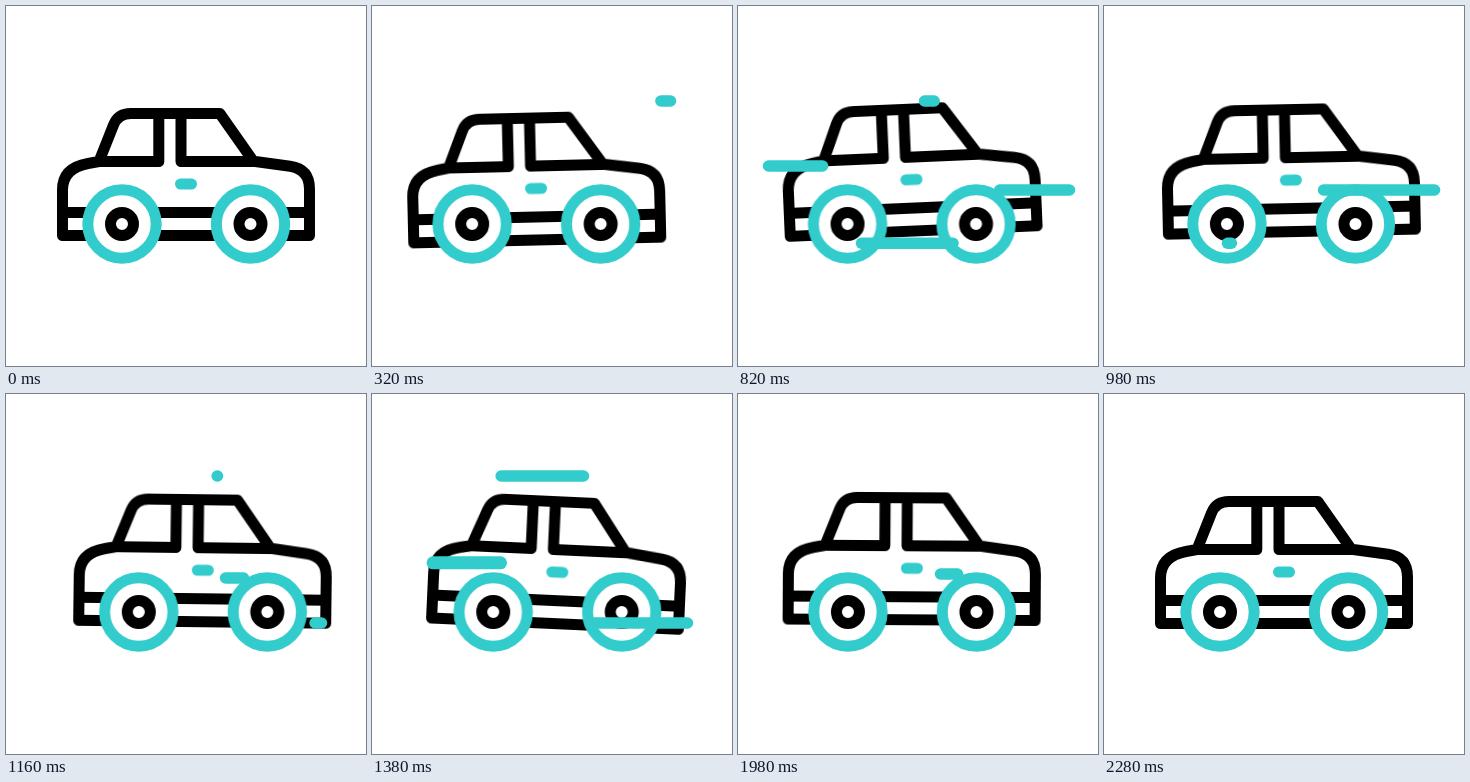
Write an HTML page that moves like this. It is 360x360 px and loops after 2.42 s.

```html
<!DOCTYPE html>
<html lang="en">
<head>
<meta charset="utf-8">
<title>Driving car</title>
<style>
  html, body { margin: 0; width: 100%; height: 100%; overflow: hidden; background: #fff; }
  svg { display: block; width: 100%; height: 100%; }

  svg * { stroke-width: 11; stroke-linecap: round; stroke-linejoin: round; }
  .dark { fill: none; stroke: #000; }
  .teal { fill: none; stroke: #3cc; }
  .tire { fill: #fff; stroke: #3cc; }

  .sway, .bob, .tilt, .streak {
    animation: 2420ms cubic-bezier(.333, 0, .667, 1) infinite;
  }
  .sway { animation-name: sway; }
  .bob { animation-name: bob; }
  .tilt { animation-name: tilt; transform-origin: 180px 180px; }
  .streak { animation-name: streak; animation-delay: var(--at); opacity: 0; stroke-width: 11.5; }
  .wide { stroke-width: 13; }

  @keyframes sway {
    0%, 89.26%, 100% { transform: translateX(0); }
    21.07% { transform: translateX(-23px); }
    50.41% { transform: translateX(17.6px); }
    68.18% { transform: translateX(-21.5px); }
  }
  @keyframes bob {
    0%, 90.9%, 100% { transform: translateY(0); }
    12.8% { transform: translateY(4.5px); }
    35.5% { transform: translateY(-4.5px); }
    57.85% { transform: translateY(.2px); }
    78.5% { transform: translateY(-4.5px); }
  }
  @keyframes tilt {
    0%, 86.8%, 100% { transform: rotate(0deg); }
    28.1% { transform: rotate(-2.9deg); }
    63.2% { transform: rotate(3.1deg); }
  }
  /* The head runs out first, then the tail catches up. */
  @keyframes streak {
    0% { opacity: 1; stroke-dasharray: 0 300; stroke-dashoffset: 0; }
    14.46% { stroke-dasharray: 112 300; stroke-dashoffset: 0; }
    25.21% { opacity: 1; stroke-dasharray: 0 300; stroke-dashoffset: -112; }
    25.22%, 100% { opacity: 0; stroke-dasharray: 0 300; stroke-dashoffset: -112; }
  }
</style>
</head>
<body>
<svg viewBox="0 0 360 360">
  <defs>
    <g id="wheel">
      <circle class="tire" r="34.2"/>
      <circle class="dark" r="11.5"/>
    </g>
  </defs>

  <g class="sway">
    <g class="bob">
      <g class="tilt">
        <path class="dark" d="M56.5 229.5V184Q56.5 162 82 157.5L93 155.5L107.5 119Q112 107.5 125 107.5H213.8L247.5 155.3L284 160.2Q303.5 163 303.5 183V229.5Z"/>
        <path class="dark" d="M56.5 206.5H303.5M93 155.5H152.8V107.5M175 107.5V155.5H247.5"/>
        <path class="teal" d="M174.5 178H185.5"/>
      </g>
    </g>
    <use href="#wheel" x="116" y="218"/>
    <use href="#wheel" x="244.5" y="218"/>
  </g>

  <g class="teal">
    <path class="streak" style="--at: 258ms" d="M298.5 95h-112"/>
    <path class="streak" style="--at: 338ms" d="M142.5 160h-112"/>
    <path class="streak" style="--at: 400ms" d="M235.5 237.3h-112"/>
    <path class="streak" style="--at: 617ms" d="M331.5 184h-112"/>
    <path class="streak" style="--at: 1110ms" d="M315.5 229h-112"/>
    <path class="streak" style="--at: 1149ms" d="M211.5 82h-112"/>
    <path class="streak wide" style="--at: 1182ms" d="M128.5 168.8h-112"/>
    <path class="streak" style="--at: 1435ms" d="M314.5 180h-112"/>
  </g>
</svg>
</body>
</html>
```
